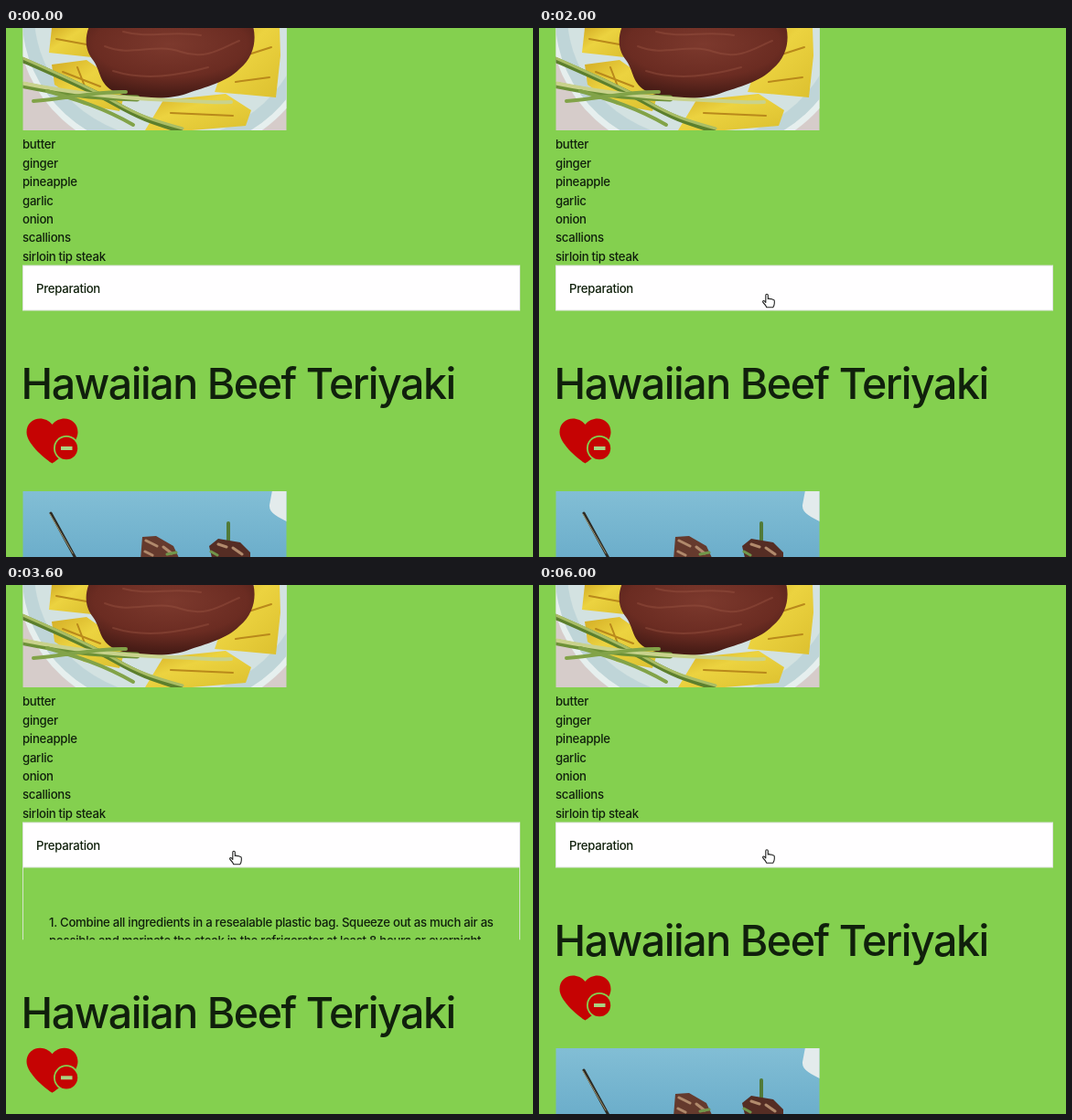
An HTML page for the animation above (6200 ms loop, 576 px wide and 579 px high).

```html
<!DOCTYPE html>
<html lang="en">
<head>
<meta charset="utf-8">
<title>Recipe accordion</title>
<style>
  html, body { margin: 0; width: 100%; height: 100%; overflow: hidden; background: #84d04f; }
  svg { display: block; width: 576px; height: 579px; }
  text { font: 450 13.2px Inter, "Open Sans", sans-serif; letter-spacing: -.021em; fill: #10200c; font-optical-sizing: none; }
  .title { font-size: 46.5px; font-weight: 480; letter-spacing: -.031em; }
  .line { fill: none; stroke-linecap: round; }
</style>
</head>
<body>
<svg viewBox="0 0 576 579">
  <defs>
    <linearGradient id="sea" x2="0" y2="1">
      <stop stop-color="#82bed5"/><stop offset=".4" stop-color="#68abc9"/><stop offset="1" stop-color="#528fb0"/>
    </linearGradient>
    <radialGradient id="beef" cx=".5" cy=".25" r=".7">
      <stop stop-color="#7c392d"/><stop offset=".65" stop-color="#6b2c22"/><stop offset="1" stop-color="#471c16"/>
    </radialGradient>
    <linearGradient id="fruit" x2="1" y2="1">
      <stop stop-color="#d3ac24"/><stop offset=".4" stop-color="#ecd340"/><stop offset="1" stop-color="#dcc02f"/>
    </linearGradient>
    <clipPath id="topPhoto"><path d="M18.5 0H306.5V112H18.5Z"/></clipPath>
    <clipPath id="lowPhoto"><path d="M18.5 507H306.5V720H18.5Z"/></clipPath>
    <clipPath id="panelClip"><rect id="panelArea" x="18" y="309" width="545" height="0"/></clipPath>
  </defs>

  <rect width="576" height="579" fill="#84d04f"/>

  <g clip-path="url(#topPhoto)">
    <rect x="18" width="289" height="112" fill="#d6ccca"/>
    <ellipse cx="178" cy="-6" rx="165" ry="150" fill="#e6efee"/>
    <ellipse cx="178" cy="-9" rx="160" ry="146" fill="#bfd5d8"/>
    <ellipse cx="178" cy="-14" rx="147" ry="136" fill="#d3e2e1"/>
    <g fill="url(#fruit)">
      <path d="M50 0H92L94 32L47 27Z"/>
      <path d="M50 40L88 35L132 66L124 91L85 84L53 62Z"/>
      <path d="M248 12L272 0H299L300 30L295 76L228 70Z"/>
      <path d="M172 79L240 72L268 90L262 107L203 112H152Z"/>
    </g>
    <path class="line" stroke="#b9891b" stroke-width="2" d="M55 12L88 18M62 48L103 64M262 30L290 21M251 59L288 54M180 93L248 96M78 43L90 74"/>
    <path fill="url(#beef)" d="M91 -2C86 10 86 24 95 35C104 47 101 61 119 70C140 79 175 79 197 72C219 64 242 59 255 45C271 32 274 13 270 -2Z"/>
    <path class="line" stroke="#985240" stroke-width="2" opacity=".45" d="M108 20C137 32 162 16 191 26S239 20 255 14M117 47C152 58 188 52 221 43M128 4C157 12 181 2 213 8"/>
    <path class="line" stroke="#5c7f2d" stroke-width="6" d="M16 34C55 51 90 66 118 82S158 102 190 112"/>
    <path class="line" stroke="#a9bd65" stroke-width="3" d="M16 32C55 49 91 65 119 81S164 102 193 110"/>
    <path class="line" stroke="#6d9138" stroke-width="7" d="M16 62C56 70 90 76 143 77"/>
    <path class="line" stroke="#c9d28c" stroke-width="4" d="M16 60C75 72 125 77 180 79S224 82 246 81"/>
    <path class="line" stroke="#82a348" stroke-width="4" d="M30 80C65 78 96 69 131 70M45 69C79 79 106 87 139 106"/>
  </g>

  <g id="ingredients"></g>

  <g id="panel" clip-path="url(#panelClip)">
    <g id="steps"></g>
    <path class="line" stroke="#d5e3cc" d="M18.5 309V720M561.5 309V720"/>
  </g>
  <rect x="18.5" y="260" width="543" height="49" fill="#fffeff" stroke="#dfe3df"/>
  <text x="33" y="290">Preparation</text>

  <g id="nextRecipe">
    <text class="title" x="16.500" y="406">Hawaiian Beef Teriyaki</text>
    <path fill="#c50303" d="M50.500 476.500C46 474 22.500 456 22.500 442.500C22.500 427 41 422.500 50.500 434C60 422.500 78.500 427 78.500 442.500C78.500 456 55 474 50.500 476.500Z"/>
    <circle cx="66" cy="460" r="14" fill="#84d04f"/>
    <circle cx="66" cy="460" r="12.200" fill="#c50303"/>
    <path d="M60 458H72.500V462H60Z" fill="#a9d382"/>
    <g clip-path="url(#lowPhoto)">
      <rect x="18" y="507" width="289" height="213" fill="url(#sea)"/>
      <path fill="#e3ebec" d="M291 506H308V541C299 535 287 532 288 522Z"/>
      <path class="line" stroke="#2d2b25" stroke-width="3" d="M49 531L78 584"/>
      <path class="line" stroke="#9c9672" d="M48 532L73 575"/>
      <path class="line" stroke="#517b39" stroke-width="4" d="M243 542V563"/>
      <path fill="#653a2d" d="M149 557L164 556L183 567L190 582H147Z"/>
      <path fill="#552d24" d="M222 567L232 559L256 563L267 574V584H226Z"/>
      <path class="line" stroke="#b18a6c" stroke-width="3" d="M153 561L165 567M172 568L181 575M152 573L160 577M232 565L241 568M248 569L258 576"/>
      <path class="line" stroke="#71964a" stroke-width="3" d="M176 576L186 574M224 573L231 577"/>
    </g>
  </g>

  <circle id="ring" cx="250" cy="292" r="29.500" fill="none" stroke="#c9342e" stroke-width="4"/>
  <path id="arrow" fill="#111" stroke="#fff" stroke-linejoin="round" d="M0 0V11.500L2.700 9L4.500 13L6.700 12L5 8.300H8.500Z"/>
  <path id="hand" fill="#fff" stroke="#222" stroke-width="1.100" stroke-linejoin="round" d="M-1.500 8V1.300Q-1.500 0 -.3 0Q1 0 1 1.300V5.200Q2.500 4.200 3.600 5.500Q5 4.700 6 6Q8 5.700 8 7.700V10Q8 12 6.500 14.500H-.5Q-1.500 12 -4.300 9.200Q-5.200 7.700 -4 7.200Q-2.700 7 -1.500 9.200Z"/>
</svg>
<script>
  const LOOP = 6200, TICK = 100, LINE = 20.4, PANEL_HEIGHT = 400;
  const CLICKS = [2100, 3300, 4300, 5600];
  const $ = id => document.getElementById(id);

  function addLines(parent, x, y, lines) {
    lines.forEach((line, i) => {
      const text = document.createElementNS(parent.namespaceURI, "text");
      text.setAttribute("x", x);
      text.setAttribute("y", y + i * LINE);
      text.textContent = line;
      parent.append(text);
    });
  }

  addLines($("ingredients"), 18, 132.4,
    ["butter", "ginger", "pineapple", "garlic", "onion", "scallions", "sirloin tip steak"]);
  addLines($("steps"), 47, 373.5, [
    "1. Combine all ingredients in a resealable plastic bag. Squeeze out as much air as",
    "possible and marinate the steak in the refrigerator at least 8 hours or overnight.", "",
    "2. Remove the meat from the marinade and place on the grill. Grill to desired",
    "temperature; medium-rare is best.", "",
    "3. Core and slice a fresh pineapple into 1/4-inch rectangles. Melt 3 tablespoons",
    "of butter.", "",
    "4. Place pineapple rafts on the grill and brush with melted butter. Grill until warm,",
    "with nice grill marks."
  ]);

  const clamp = v => Math.max(0, Math.min(1, v));
  const ease = v => v * v * (3 - 2 * v);
  const progress = (t, start, length) => ease(clamp((t - start) / length));
  const place = (el, x, y) => el.setAttribute("transform", `translate(${x} ${y})`);
  const show = (el, visible) => el.setAttribute("visibility", visible ? "visible" : "hidden");

  function draw(t) {
    // Clicks alternately open and close the panel.
    const openness = CLICKS.reduce((sum, click, i) =>
      sum + (i % 2 ? -1 : 1) * progress(t, click + 50, 350), 0);
    const height = PANEL_HEIGHT * openness;
    $("panelArea").setAttribute("height", height);
    place($("nextRecipe"), 0, height);

    const click = CLICKS.find(c => t >= c && t < c + 250);
    $("ring").setAttribute("opacity", click ? 0.7 * (1 - (t - click) / 250) : 0);

    const move = progress(t, 1300, 400);
    const x = 252 - 2.7 * move;
    const y = 231 + 60.3 * move - (t >= 4000 ? 1.5 : 0);
    const overButton = y >= 260;
    show($("arrow"), t >= 1100 && !overButton);
    show($("hand"), overButton);
    place($("arrow"), x, y);
    place($("hand"), x, y);
  }

  function frame(now) {
    draw(Math.floor(now % LOOP / TICK) * TICK);
    requestAnimationFrame(frame);
  }
  draw(0);
  requestAnimationFrame(frame);
</script>
</body>
</html>
```
